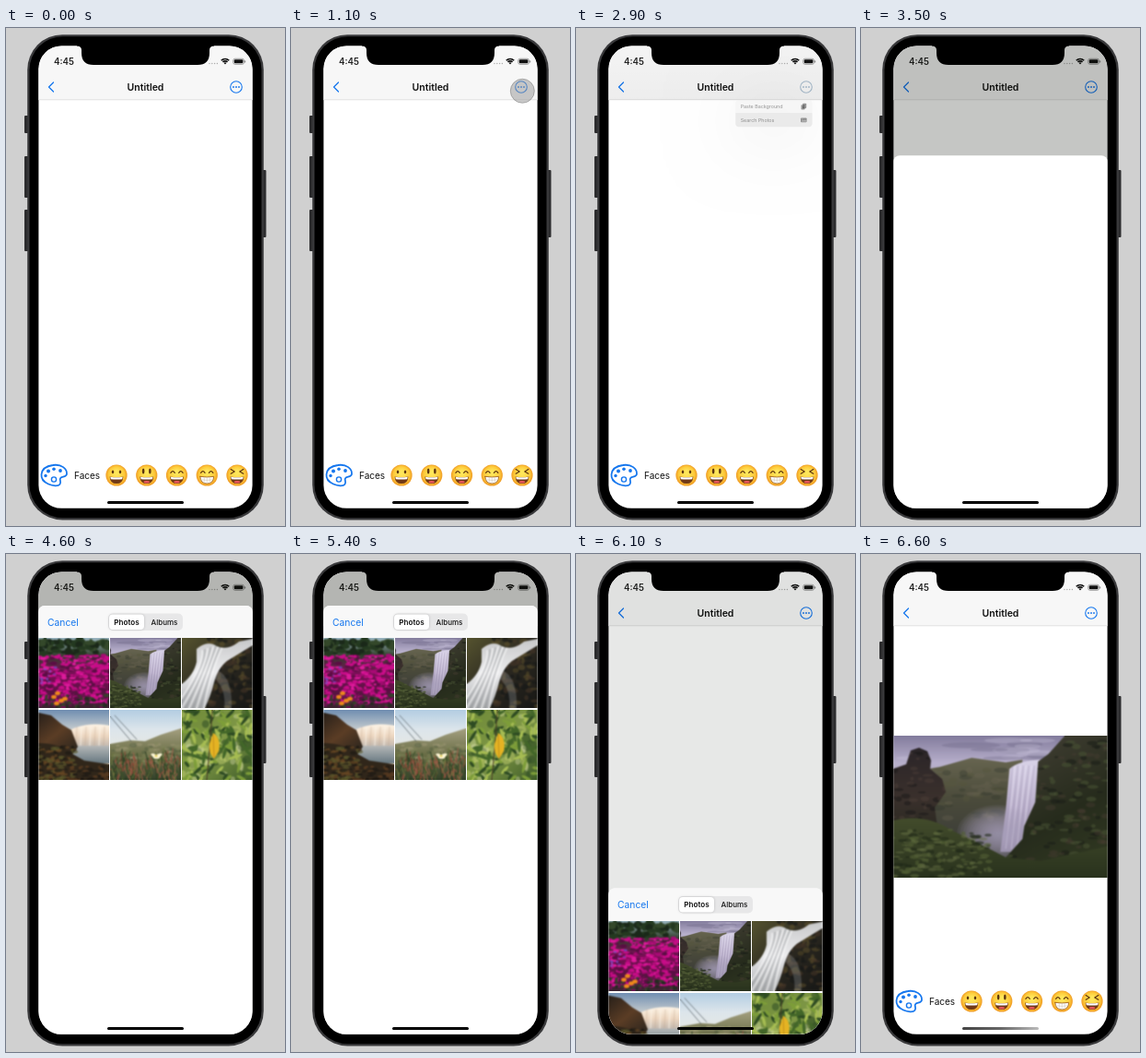
Animation of 303x540 px, one loop 6.65 s. Source, as an HTML page with a canvas:

```html
<!DOCTYPE html>
<html lang="en">
<head>
<meta charset="utf-8">
<style>
html, body { margin: 0; width: 100%; height: 100%; overflow: hidden; background: #d0d0d0; }
canvas { display: block; width: 303px; height: 540px; }
</style>
</head>
<body>
<canvas id="stage"></canvas>
<script>
const LOOP = 6650, W = 303, H = 540, BLUE = '#1677ee';
const canvas = document.getElementById('stage');
const dpr = window.devicePixelRatio || 1;
canvas.width = W * dpr;
canvas.height = H * dpr;
const screenCtx = canvas.getContext('2d');
let c = screenCtx;

const clamp = v => Math.max(0, Math.min(1, v));
const ramp = (t, a, b) => clamp((t - a) / (b - a));
const smooth = p => p * p * (3 - 2 * p);
const easeOut = p => 1 - (1 - p) ** 3;

function box(x, y, w, h, r, fill, stroke, lw = 1) {
  c.beginPath();
  c.roundRect(x, y, w, h, r);
  paint(fill, stroke, lw);
}
function paint(fill, stroke, lw = 1) {
  if (fill) { c.fillStyle = fill; c.fill(); }
  if (stroke) { c.strokeStyle = stroke; c.lineWidth = lw; c.stroke(); }
}
function oval(x, y, rx, ry, fill, stroke, lw) {
  c.beginPath();
  c.ellipse(x, y, rx, ry, 0, 0, 7);
  paint(fill, stroke, lw);
}
function path(d, fill, stroke, lw) {
  const p = new Path2D(d);
  if (fill) { c.fillStyle = fill; c.fill(p); }
  if (stroke) { c.strokeStyle = stroke; c.lineWidth = lw || 1; c.stroke(p); }
}
function text(s, x, y, size, weight = 400, color = '#111', align = 'left') {
  c.font = `${weight} ${size}px Inter, Roboto, sans-serif`;
  c.textAlign = align;
  c.fillStyle = color;
  c.fillText(s, x, y);
}
function shade(x0, y0, x1, y1, ...colors) {
  const g = c.createLinearGradient(x0, y0, x1, y1);
  colors.forEach((col, i) => g.addColorStop(i / (colors.length - 1), col));
  return g;
}

// Photos, painted once and softened
function photo(w, h, draw) {
  const img = document.createElement('canvas');
  img.width = w * 3;
  img.height = h * 3;
  c = img.getContext('2d');
  c.scale(3, 3);
  c.lineCap = 'round';
  draw(w, h);
  c.filter = 'blur(2.4px)';
  c.drawImage(img, 0, 0, w, h);
  c = screenCtx;
  return img;
}
let seed = 7;
const rnd = () => (seed = seed * 16807 % 2147483647) / 2147483647;
function scatter(n, x, y, w, h, rx, ry, ...colors) {
  for (let i = 0; i < n; i++) {
    oval(x + rnd() * w, y + rnd() * h, rx * (.5 + rnd()), ry * (.5 + rnd()), colors[i % colors.length]);
  }
}
function blades(n, x, y, w, h, len, ...colors) {
  for (let i = 0; i < n; i++) {
    const px = x + rnd() * w, py = y + rnd() * h;
    path(`M${px} ${py}l${(rnd() - .5) * len} ${-len * (.5 + rnd())}`, null, colors[i % colors.length], .9);
  }
}
function clipTo(d, draw) {
  c.save();
  c.clip(new Path2D(d));
  draw();
  c.restore();
}

const falls = photo(232, 154, (w, h) => {
  c.fillStyle = shade(0, 0, 0, 60, '#827b9c', '#b8b0cc', '#aaa2b8');
  c.fillRect(0, 0, w, h);
  scatter(14, 20, 4, 150, 22, 22, 3, '#c6bfd855', '#69648055');
  path('M0 42L50 34L85 24L122 29L140 26L130 154H0Z', shade(0, 25, 0, 110, '#66644f', '#4b4b3b', '#3d3e38'));
  scatter(50, 45, 36, 75, 55, 6, 2.5, '#55563d66', '#2f352a55', '#70695744');
  path('M126 36Q136 27 160 26L152 80L142 126H116L122 80Z', shade(0, 26, 0, 128, '#d9d3e8', '#b9aeca', '#90869f'));
  for (let i = 0; i < 9; i++) path(`M${129 + i * 3} 33Q${126 + i * 2.7} 70 ${119 + i * 3} 122`, null, i % 2 ? '#f1eafa66' : '#81789833', 1.6);
  for (let i = 14; i > 0; i--) oval(114, 106, i * 3.2, i * 2.2, '#a89db71b');
  const cliff = 'M232 0H186L168 20L157 28L154 72L142 98L140 112L122 132L118 154H232Z';
  path(cliff, shade(150, 20, 220, 150, '#3b3a2e', '#262b1c', '#313a22'));
  clipTo(cliff, () => scatter(190, 120, 5, 115, 150, 4, 2, '#47503299', '#1b1f1899', '#4a3c3466'));
  const rock = 'M0 36L14 31L19 16L28 13L37 17L41 27L40 36L53 47L57 61L45 78L48 100L0 130Z';
  path(rock, shade(0, 15, 0, 120, '#2b2528', '#3a302c', '#22251c'));
  clipTo(rock, () => scatter(60, 0, 15, 58, 100, 4, 2, '#51423a66', '#1b191a88'));
  path('M0 92Q35 84 62 102Q92 116 122 132L160 136L232 120V154H0Z', shade(0, 90, 0, 154, '#424b2b', '#29321d'));
  scatter(180, 0, 102, 105, 52, 3.5, 1.5, '#53603599', '#1f281899', '#6770447a');
});

const flowers = photo(77, 76, (w, h) => {
  c.fillStyle = shade(0, 0, 0, h, '#9db8c4', '#31402b', '#7a0f56', '#5c1243', '#3a2430');
  c.fillRect(0, 0, w, h);
  scatter(70, 0, 3, w, 14, 4, 3, '#243920', '#34482a', '#1a2819');
  scatter(380, 0, 19, w, 52, 2.6, 1.4, '#c80c88', '#a80a74', '#dd1a9b', '#5a0d43', '#c80c88');
  scatter(12, 0, 32, 20, 18, 1.5, 1.1, '#7642b0', '#9146bc');
  scatter(60, 0, 62, w, 14, 2.2, 1.6, '#242c21', '#35412a', '#6b1450');
  [[17, 64], [25, 68], [20, 71], [29, 66], [21, 60]].forEach(([x, y]) => oval(x, y, 3, 2.2, '#ee8a1c'));
});

const streams = photo(77, 76, (w, h) => {
  c.fillStyle = shade(0, 0, w, h, '#55532f', '#2b2820', '#171715');
  c.fillRect(0, 0, w, h);
  scatter(110, 20, 0, 57, 76, 3.5, 2.5, '#64562e77', '#181918aa', '#48372788');
  const stream = 'M16 12Q28 2 38 9Q50 14 62 4L77 1V8Q62 17 49 25Q39 33 35 48Q31 64 25 76H0V50Q13 40 16 26Z';
  path(stream, shade(0, 0, 0, h, '#c6c7c8', '#ececee', '#a9abad'));
  clipTo(stream, () => {
    for (let i = 0; i < 9; i++) path(`M${46 - i * 3} ${6 + i}Q${32 - i} 32 ${24 - i * 4} 76`, null, i % 2 ? '#70757944' : '#ffffff77', 2);
  });
  path('M40 36Q55 44 54 76H46Q48 56 36 44Z', '#8d8f9055');
});

const sunset = photo(77, 76, (w, h) => {
  c.fillStyle = shade(0, 0, 0, 40, '#6f8db0', '#bfc7cc', '#ead5b8');
  c.fillRect(0, 0, w, h);
  path('M36 21Q55 13 77 17V42H38Z', shade(0, 15, 0, 42, '#fff6e8', '#ecd6c0', '#b9b2ac'));
  for (let i = 0; i < 7; i++) path(`M${42 + i * 5} 19L${41 + i * 5} 38`, null, i % 2 ? '#fffaf166' : '#b99b8133', 2);
  path('M30 39H77V58H30Z', shade(0, 39, 0, 58, '#b4b7b7', '#667780'));
  path('M0 3L14 6L26 16L36 22L43 40L36 50L0 60Z', shade(0, 5, 36, 50, '#2a211a', '#5b3d25', '#2a241d'));
  path('M0 36Q22 36 34 46L50 55L77 59V76H0Z', '#30261a');
  scatter(130, 0, 40, 40, 36, 2.8, 1.6, '#6a4a24aa', '#1d1a13aa', '#5b592baa');
  scatter(40, 35, 61, 42, 15, 3, 1.5, '#52371f', '#221c15');
});

const meadow = photo(77, 76, (w, h) => {
  c.fillStyle = shade(0, 0, 0, 42, '#b3cde2', '#dce5eb', '#e7e8e4');
  c.fillRect(0, 0, w, h);
  path('M0 37L22 33L38 34L55 27L77 20V76H0Z', shade(0, 22, 0, h, '#a09c7c', '#686c45', '#33402a'));
  scatter(90, 0, 37, w, 22, 3.5, 1.6, '#81845977', '#4f5d3f77', '#aaa08066');
  blades(190, 0, 54, w, 27, 9, '#374e27', '#66703a', '#8c4636', '#283b21', '#a0604a');
  path('M0 7L23 34M5 6L29 32', null, '#5b656b', .6);
  path('M44 48Q47 46 50 49Q54 46 57 48L53 53L48 53Z', '#fff6d6');
  oval(50, 50, 1.6, 1, '#e6cf56');
});

const leaves = photo(77, 76, (w, h) => {
  c.fillStyle = shade(0, 0, w, h, '#6f8a38', '#7d9645', '#3f5c29');
  c.fillRect(0, 0, w, h);
  scatter(70, 0, 0, w, h, 4, 4, '#c3d07077', '#34522699', '#dce2ad66');
  for (let i = 0; i < 110; i++) {
    c.save();
    c.translate(rnd() * w, rnd() * h);
    c.rotate(rnd() * 6);
    oval(0, 0, 6 * (.5 + rnd()), 1.7, ['#7d9d39', '#426628', '#a6bc52', '#2e4b22'][i % 4]);
    c.restore();
  }
  path('M33 0Q31 35 27 76', null, '#493d26', 1);
  path('M34 25Q43 31 40 45L35 53Q29 47 30 37Z', '#e5b323');
  path('M34 27L35 52', null, '#b98318', .7);
});

// Phone interface
function moreButton(color) {
  oval(250, 64, 6.3, 6.3, null, color, 1.1);
  [-3, 0, 3].forEach(d => oval(250 + d, 64, .95, .95, color));
}

function statusBar() {
  text('4:45', 52, 39.7, 9.7, 600, '#222');
  for (let i = 0; i < 4; i++) oval(221 + i * 2.8, 38.5, .7, .7, '#aaa');
  c.lineCap = 'butt';
  [1.2, 3.6, 6].forEach(r => {
    c.beginPath();
    c.arc(238, 39.5, r, -Math.PI * .75, -Math.PI * .25);
    paint(null, '#111', 1.7);
  });
  box(246.8, 33.3, 11.6, 6, 1.8, null, '#777', .7);
  box(247.8, 34.3, 9.6, 4, 1, '#111');
  box(259.2, 35.2, 1, 2.2, .5, '#777');
}

function palette() {
  path('M51 474C60 472.5 66.5 478 66 483.5C65.6 487.5 60.5 486 59 488.2C57.7 490 60.5 492.3 58.5 494.8C56.8 497 51 496.7 46 494.5C41 492.2 38 488.5 38.5 484C39 478.5 44 475 51 474Z', null, BLUE, 1.8);
  [[43, 485.5, 1.7], [46, 480.5, 2], [52, 478.3, 1.8], [59, 480, 1.9]].forEach(([x, y, r]) => oval(x, y, r, r, BLUE));
  oval(52, 489.5, 2.6, 2.6, null, BLUE, 1.4);
}

function face(i) {
  const g = c.createRadialGradient(0, -3, 2, 0, 0, 12);
  g.addColorStop(0, '#ffe65a');
  g.addColorStop(.65, '#fdc93a');
  g.addColorStop(1, '#ee9622');
  oval(0, 0, 11.6, 11.6, g);
  const ink = '#5b3410';
  c.lineCap = c.lineJoin = 'round';
  [-1, 1].forEach(s => {
    if (i === 0) oval(s * 4, -3.6, 1.2, 1.8, ink);
    if (i === 1) oval(s * 3.6, -4.5, 1.3, 3, ink);
    if (i === 2 || i === 3) path(`M${s * 4.4 - 2.2} -2.6q2.2 -3.4 4.4 0`, null, ink, 1.2);
    if (i === 4) path(`M${s * 6.8} -6.5L${s * 2.8} -4L${s * 6.8} -1.7`, null, ink, 1.2);
  });
  const mouth = 'M-7.4 1.4Q0 2.6 7.4 1.4Q7 9 0 9Q-7 9 -7.4 1.4Z';
  path(mouth, i === 3 ? '#fff' : '#713916', i === 3 ? '#9a5a1a' : null, .8);
  if (i === 3) path('M-6.6 4.8Q0 6 6.6 4.8M-3 2V8M0 2V8.5M3 2V8', null, '#c9bda9', .5);
  else {
    path('M-6.7 1.8Q0 2.8 6.7 1.8L6.2 4.2Q0 5 -6.2 4.2Z', '#fff');
    if (i) oval(0, 7.3, 3.2, 1.3, '#e9575c');
  }
}

function editor(t, menu) {
  c.fillStyle = '#fff';
  c.fillRect(35, 19, 233, 502);
  if (t >= 6150) c.drawImage(falls, 35, 197, 232.5, 154);
  c.fillStyle = '#f7f7f7';
  c.fillRect(35, 19, 233, 59);
  c.fillStyle = '#d8d8d8';
  c.fillRect(35, 77.5, 233, .7);
  text('Untitled', 151.5, 67.7, 10.5, 600, '#111', 'center');
  c.lineCap = c.lineJoin = 'round';
  path('M51.5 59L46.5 64L51.5 69', null, BLUE, 1.3);
  moreButton(menu > .3 ? '#a9bdce' : BLUE);
  palette();
  text('Faces', 74, 489, 10);
  for (let i = 0; i < 5; i++) {
    c.save();
    c.translate(120 + i * 32.75, 485);
    face(i);
    c.restore();
  }
}

function drawMenu(open, row) {
  if (!open) return;
  c.save();
  c.globalAlpha = open;
  c.fillStyle = shade(0, 19, 0, 78, '#00000008', '#00000018');
  c.fillRect(35, 19, 233, 59);
  c.translate(250, 78);
  c.scale(.2 + .8 * open, .2 + .8 * open);
  c.translate(-250, -78);
  c.shadowColor = 'rgba(0,0,0,.22)';
  c.shadowBlur = 75 * dpr;
  c.shadowOffsetY = 8 * dpr;
  box(108, 78, 154, 54, 7, '#efefef');
  c.shadowColor = 'transparent';
  if (row === 0) box(108, 78, 154, 27, [7, 7, 0, 0], '#d9d9d9');
  if (row === 1) box(108, 105, 154, 27, [0, 0, 7, 7], '#d9d9d9');
  c.fillStyle = '#d0d0d0';
  c.fillRect(108, 104.7, 154, .6);
  text('Paste Background', 118, 95, 9.9);
  text('Search Photos', 118, 122, 9.9);
  box(242.8, 85, 7.6, 10, 1.5, '#111');
  box(239.8, 87.5, 7.4, 10, 1.5, '#111', '#d9d9d9', .7);
  path('M243.5 88V91.5H247', null, '#ddd', .8);
  box(239, 114, 12, 9, 1.5, '#111');
  path('M240.3 121.5L243.5 118L245.5 120L247.5 117.5L250 120.5V121.7H240.3Z', '#eee');
  oval(242.3, 116.5, 1, 1, '#eee');
  c.restore();
}

function sheet(y, loaded) {
  c.save();
  c.translate(0, y);
  box(35, 0, 233, 470, [7, 7, 0, 0], '#fff');
  c.globalAlpha = loaded;
  box(35, 0, 233, 35, [7, 7, 0, 0], '#f8f8f8');
  text('Cancel', 45, 21.5, 10.3, 400, BLUE);
  box(111, 8.5, 81, 18.5, 5, '#e7e7e8');
  c.shadowColor = 'rgba(0,0,0,.2)';
  c.shadowBlur = 3 * dpr;
  box(112, 9.5, 38, 16.5, 4, '#fff');
  c.shadowColor = 'transparent';
  text('Photos', 131, 20.8, 8.1, 600, '#111', 'center');
  text('Albums', 172, 20.8, 8, 500, '#111', 'center');
  [flowers, falls, streams, sunset, meadow, leaves].forEach((img, i) => {
    const x = 35 + i % 3 * 78, top = 35 + (i > 2) * 78;
    if (img === falls) c.drawImage(img, 117, 0, 462, 462, x, top, 77, 76);
    else c.drawImage(img, x, top, 77, 76);
  });
  c.restore();
}

const drag = [[550, 250, 67], [900, 253, 67], [1350, 249, 70], [2000, 215, 95], [2150, 215, 95], [2500, 213, 119], [2800, 213, 119]];
function finger(t) {
  let i = 0;
  while (i < drag.length - 2 && t > drag[i + 1][0]) i++;
  const [a, x, y] = drag[i], [b, x2, y2] = drag[i + 1], p = smooth(ramp(t, a, b));
  return [x + (x2 - x) * p, y + (y2 - y) * p];
}
function touch(x, y, alpha) {
  if (alpha <= 0) return;
  c.globalAlpha = alpha;
  oval(x, y, 13, 13, 'rgba(150,150,150,.5)', 'rgba(110,110,110,.6)', .8);
  c.globalAlpha = 1;
}

function phoneBody() {
  c.fillStyle = '#d0d0d0';
  c.fillRect(0, 0, W, H);
  [[20, 95, 19], [20, 139, 45], [20, 197, 45], [278, 154, 73]].forEach(([x, y, h]) => box(x, y, 4.5, h, 1, '#2c2c2e'));
  box(23.2, 7.2, 256.6, 526.3, 38, '#39393b');
  box(25.5, 9.3, 252, 522, 36, '#000');
}

function frame() {
  const t = performance.now() % LOOP;
  const menu = easeOut(ramp(t, 1120, 1380)) * (1 - smooth(ramp(t, 2780, 3000)));
  const [fx, fy] = finger(t);
  const row = t < 1400 || fy < 78 ? -1 : fy < 105 ? 0 : 1;

  // Critically damped rise, eased fall
  const k = Math.max(0, t - 3240) * .0121;
  let up = 1 - Math.exp(-k) * (1 + k);
  if (t > 3950) up = 1 - smooth(ramp(t, 5870, 6250));

  c.setTransform(dpr, 0, 0, dpr, 0, 0);
  phoneBody();
  c.save();
  c.beginPath();
  c.roundRect(35.4, 19.4, 232.2, 501.4, 25);
  c.clip();
  editor(t, menu);
  drawMenu(menu, row);
  statusBar();
  if (up > 0) {
    c.fillStyle = `rgba(8,12,0,${.28 * up})`;
    c.fillRect(35, 19, 233, 502);
    sheet(521 - 465 * up, ramp(t, 3620, 3820));
  }
  const bar = t > 6150 ? shade(110, 0, 193, 0, '#444', '#666', '#bbb') : '#000';
  box(110, 513, 83, 3, 1.5, bar);
  touch(fx, fy, ramp(t, 550, 650) * (1 - ramp(t, 2680, 2780)));
  touch(150, 130, ramp(t, 5630, 5680) * (1 - ramp(t, 5740, 5800)));
  c.restore();
  path('M77 18V19.4Q82 19.4 82 24V27Q82 40 95 40H208Q221 40 221 27V24Q221 19.4 226 19.4V18Z', '#000');
  requestAnimationFrame(frame);
}
frame();
</script>
</body>
</html>
```
